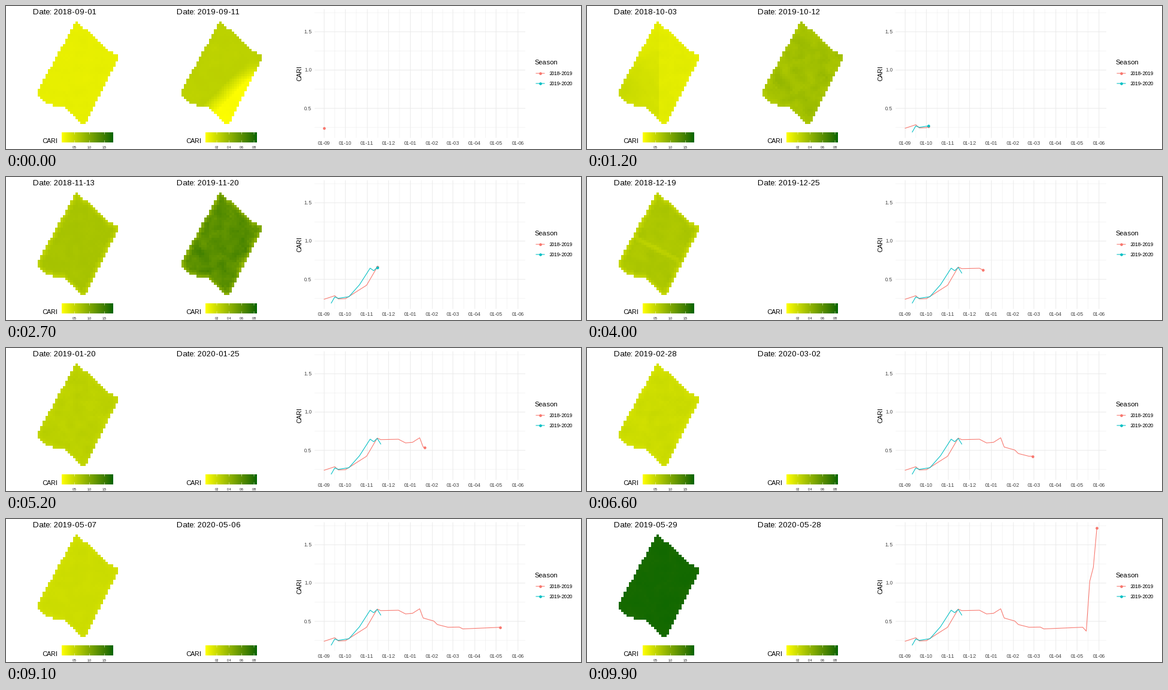
A matplotlib script for the animation above (10 s loop, 960 px wide and 240 px high).

```python
import numpy as np
import matplotlib.pyplot as plt
from matplotlib.animation import FuncAnimation
from matplotlib.colors import ListedColormap
from matplotlib.path import Path

W, H, DPI = 960, 240, 100
PX = 72 / DPI
FRAMES = 100
LAST = FRAMES - 1
RED, TEAL, GRID, GREY = "#F8766D", "#00BFC4", "#EBEBEB", "#4D4D4D"
plt.rcParams.update({"font.family": "Liberation Sans",
                     "text.hinting_factor": 1,  # whole-pixel glyph advances
                     "path.snap": False})

fig = plt.figure(figsize=(W / DPI, H / DPI), dpi=DPI, facecolor="white")
ax = fig.add_axes([0, 0, 1, 1])
ax.axis("off")


def text(x, y, s, size, color="black", **kw):
    return ax.text(x, y, s, fontsize=size * PX, color=color, va="baseline", **kw)


def line(xs, ys, color, width=1.07, **kw):
    return ax.plot(xs, ys, color=color, lw=width * PX, **kw)[0]


def dot(x, y, color):
    return ax.plot([x], [y], "o", color=color, ms=4.62 * PX, mew=0, zorder=5)[0]


def image(data, x, y, w, h, **kw):
    return ax.imshow(data, cmap=cmap, extent=(x, x + w, y + h, y),
                     interpolation="nearest", aspect="auto", **kw)


def bump(f, peak, width):
    return np.exp(-((f - peak) / width) ** 2)


# Yellow to dark green, blended in Lab space
TO_XYZ = np.array([[.4124, .3576, .1805], [.2126, .7152, .0722], [.0193, .1192, .9505]])
WHITE = TO_XYZ.sum(axis=1)
TO_LAB = np.array([[0, 116, 0], [500, -500, 0], [0, 200, -200]])


def rgb_to_lab(rgb):
    c = np.array(rgb) / 255
    lin = np.where(c > .04045, ((c + .055) / 1.055) ** 2.4, c / 12.92)
    t = TO_XYZ @ lin / WHITE
    return TO_LAB @ np.where(t > .008856, np.cbrt(t), 7.787 * t + 16 / 116) - [16, 0, 0]


def lab_to_rgb(lab):
    # The first matrix is singular-free: each row mixes x, y and z responses
    g = np.linalg.solve(TO_LAB, (lab + [16, 0, 0]).T)
    t = np.where(g > .2069, g ** 3, (g - 16 / 116) / 7.787)
    lin = np.clip(np.linalg.solve(TO_XYZ, t * WHITE[:, None]), 0, 1).T
    return np.where(lin > .0031308, 1.055 * lin ** (1 / 2.4) - .055, 12.92 * lin)


low_lab, high_lab = rgb_to_lab([255, 255, 0]), rgb_to_lab([0, 100, 0])
mix = np.linspace(0, 1, 256)[:, None]
cmap = ListedColormap(lab_to_rgb(low_lab * (1 - mix) + high_lab * mix))

# Turning points of each season: five-day step and mean index
RED_TURNS = [(0, .24), (3, .286), (4, .244), (6, .247), (12, .423), (15, .66),
             (16, .64), (21, .645), (23, .597), (25, .605), (27, .664), (28, .543),
             (31, .504), (32, .458), (35, .423), (38, .425), (39, .401), (50, .423),
             (51, .372), (52, 1.026), (53, 1.205), (54, 1.718)]
TEAL_TURNS = [(2, .19), (3, .27), (4, .252), (7, .273), (10, .43), (13, .646),
              (14, .613), (15, .656), (16, .582)]


def day_x(day):
    return 531.2 + 1.181 * day


def val_y(v):
    return 236 - 128.5 * np.asarray(v)


class Series:
    def __init__(self, turns, color, hide_after_end):
        self.step, self.mean = np.array(turns).T
        days = 5 * self.step
        self.x = day_x(days + (days > 180))  # the axis has a leap day
        self.y = val_y(self.mean)
        self.at = np.ceil(days * LAST / 270 - .5)
        self.hide = hide_after_end
        self.path = line([], [], color, zorder=4)
        self.head = dot(0, 0, color)

    def update(self, f):
        seen = self.at <= f
        x, y = np.interp(f, self.at, self.x), np.interp(f, self.at, self.y)
        self.path.set_data(np.append(self.x[seen], x), np.append(self.y[seen], y))
        self.path.set_visible(seen.any())
        self.head.set_data([x], [y])
        self.head.set_visible(seen.any() and not (self.hide and f > self.at[-1]))


red = Series(RED_TURNS, RED, False)
teal = Series(TEAL_TURNS, TEAL, True)

# Field outline on a grid of cells
ROWS, COLS = 41, 32
LEFT, TOP, WIDE, TALL = 53, 26, 134, 172
row, col = np.mgrid[:ROWS, :COLS]
outline = Path([(117.5, 24.5), (174, 77), (189, 80.5), (186.3, 92), (131.5, 198),
                (127, 198.5), (95, 168.5), (80, 168.5), (78, 166), (63.5, 161),
                (52, 148), (54.3, 139.5)])
centres = np.column_stack([(LEFT + WIDE / COLS * (col + .5)).ravel(),
                           (TOP + TALL / ROWS * (row + .5)).ravel()])
inside = outline.contains_points(centres).reshape(ROWS, COLS)


def neighbours(a):
    p = np.pad(a, 1)
    return p[:-2, 1:-1], p[2:, 1:-1], p[1:-1, :-2], p[1:-1, 2:]


def erode(mask):
    return mask & np.logical_and.reduce(neighbours(mask))


def blur(a, times):
    for _ in range(times):
        a = (a + sum(neighbours(a))) / 5
    return a / a.std()


core = erode(inside)
rim = (inside & ~core) + .35 * (core & ~erode(core))

rng = np.random.default_rng(7)


def noise():
    broad, fine = rng.normal(size=(2, ROWS, COLS))
    return .6 * blur(broad, 5) + .4 * blur(fine, 1)


bank = [[noise() for _ in range(FRAMES // 2 + 1)] for _ in range(2)]
base = [noise(), noise()]

patch = (col < 16) * np.clip((row - 2) / 22, .15, 1) * (1 - col / 32)
off_line = np.abs((row - 18.4) - (col - 7.6) * 8.1 / 15.5)
stripe = np.clip(1.5 - off_line, 0, 1) * (col > 6) * (col < 24)
corner = np.clip((col + row - 41) / 8, 0, 1) * np.clip((row - 15) / 8, 0, 1)


def texture(side, f):
    i, part = f // 2, f % 2 / 2
    a, b = bank[side][i:i + 2]
    return .6 * base[side] + .5 * (a * (1 - part) + b * part)


def first_field(f):
    mean = np.interp(f, red.at, red.mean)
    edge = .2 * bump(f, 34, 14) + .08 * bump(f, 78, 14)
    grain = .008 + .02 * bump(f, 50, 40)
    return (mean + edge * (.25 - rim) + grain * texture(0, f)
            + .2 * bump(f, 12.5, 4.5) * patch - .11 * bump(f, 40, 3.5) * stripe)


def second_field(f):
    mean = np.interp(f, 5 * LAST / 260 * (teal.step - 2), teal.mean)
    grown = f / 27
    fade = max(0, 1 - f / 2)
    return (mean + .16 * grown ** 2 * (.2 - rim) + (.006 + .045 * grown) * texture(1, f)
            + fade * (.06 - .22 * corner))


class FieldMap:
    def __init__(self, dx, start, span, low, high, ticks, field):
        self.start, self.span, self.field = np.datetime64(start), span, field
        self.title = text(45 + dx, 14, "", 13.2)
        self.img = image(np.zeros((ROWS, COLS)), LEFT + dx, TOP, WIDE, TALL,
                         vmin=low, vmax=high)
        bar = 93 + dx
        image(np.linspace(0, 1, 256)[None], bar, 212, 86, 17)
        text(60.5 + dx, 230, "CARI", 11)
        for t in ticks:
            tx = bar + 86 * (t - low) / (high - low)
            for y in (212, 225.6):
                line([tx, tx], [y, y + 3.4], "white", .53, solid_capstyle="butt")
            text(tx, 239, f"{t:.1f}", 5, ha="center")

    def update(self, f):
        day = f * self.span // LAST
        self.title.set_text(f"Date: {self.start + day}")
        self.img.set_data(np.ma.masked_where(~inside, self.field(f)))


first = FieldMap(0, "2018-09-01", 270, .07, 1.79, (.5, 1, 1.5), first_field)
second = FieldMap(240, "2019-09-11", 260, .016, .848, (.2, .4, .6, .8), second_field)

# Chart panel
x0, x1, y0, y1 = 515.2, 867, 5.5, 221.4


def grid_x(day, width=1.07):
    line([day_x(day)] * 2, [y0, y1], GRID, width, solid_capstyle="butt")


def grid_y(v, width=1.07):
    line([x0, x1], [val_y(v)] * 2, GRID, width, solid_capstyle="butt")


months = np.arange("2019-09", "2020-07", dtype="datetime64[M]")
starts = (months.astype("datetime64[D]") - np.datetime64("2019-09-01")).astype(int)
for d in (starts[1:] + starts[:-1]) / 2:
    grid_x(d, .53)
for v in np.arange(.25, 2, .5):
    grid_y(v, .53)
for month, d in zip(months, starts):
    grid_x(d)
    text(day_x(d), 233, f"01-{str(month)[-2:]}", 8.8, GREY, ha="center")
for v in (.5, 1, 1.5):
    grid_y(v)
    text(510.3, val_y(v) + 3, f"{v:.1f}", 8.8, GREY, ha="right")
text(493.5, 113.5, "CARI", 11, rotation=90, rotation_mode="anchor", ha="center")

text(882.7, 98, "Season", 11)
for y, name, color in ((113, "2018-2019", RED), (130, "2019-2020", TEAL)):
    line([885, 899], [y, y], color)
    dot(892, y, color)
    text(905.7, y + 3, name, 8.8)

ax.set(xlim=(0, W), ylim=(H, 0), aspect="auto")


def draw(f):
    first.update(f)
    second.update(f)
    second.img.set_visible(f < 28)
    red.update(f)
    teal.update(f)
    return []


anim = FuncAnimation(fig, draw, frames=FRAMES, init_func=lambda: draw(0),
                     interval=100, repeat=True, repeat_delay=0)
plt.show()
```
